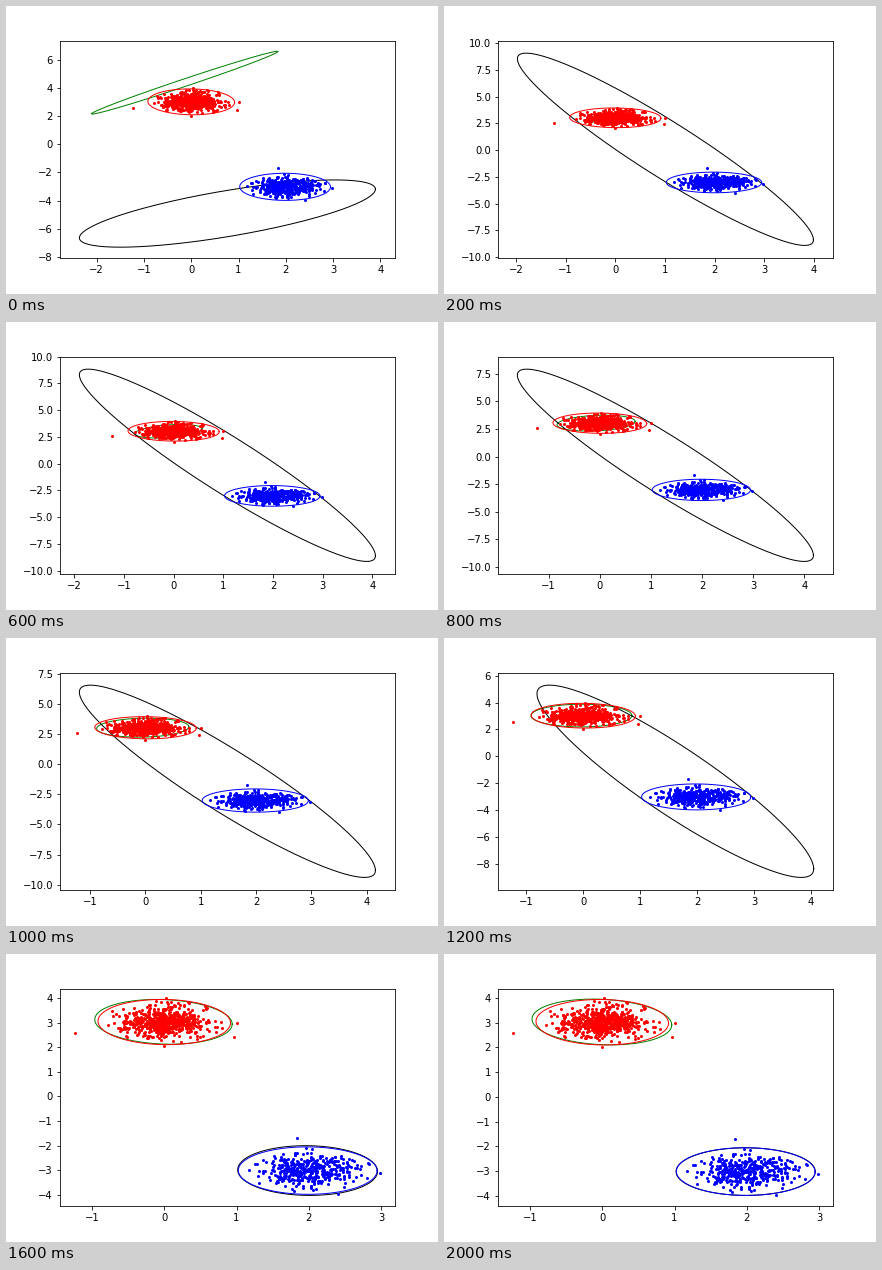
Write a matplotlib script that moves like this. It is 432 by 288 pixels and loops after 2200 ms.

```python
import numpy as np
import matplotlib.pyplot as plt
from matplotlib.animation import FuncAnimation

FRAMES, INTERVAL = 11, 200
PAD = 1.028      # ellipses claim slightly more room than their outline
MARGIN = 0.05
VAR = 0.103      # variance of one cluster along each axis
GAP = np.array([-1.88, 5.96])    # from the blue cluster to the red one

# ellipse: centre x, centre y, half width, half height, correlation
RED = np.array([0.0, 3.02, 0.917, 0.92, -0.04])
BLUE = np.array([1.985, -3.02, 0.96, 0.965, -0.01])
GREEN_START = (-0.14, 4.38, 1.97, 2.23, 0.992)
BLACK_START = (0.765, -4.92, 3.13, 2.39, 0.724)
SLIVER = np.array([-0.18, 3.02, 0.45, 0.40, 0.75])
GREEN_END = np.array([-0.005, 3.03, 0.967, 0.926, -0.13])

RED_STRAYS = [(-1.232, 2.57), (0.97, 2.42), (1.0, 3.0), (0.0, 2.03), (0.03, 3.98)]
BLUE_STRAYS = [(1.84, -1.7), (2.98, -3.13), (2.41, -3.97)]

rng = np.random.default_rng(7)
turn = np.linspace(0, 2 * np.pi, 241)


def cloud(centre, count, strays):
    pts = rng.normal(0, 0.31, (count, 2))
    pts = pts[np.hypot(*pts.T) < 0.9]
    return np.vstack([pts - pts.mean(axis=0) + centre, strays])


def outline(cx, cy, a, b, rho):
    x = cx + a * np.cos(turn)
    y = cy + b * (rho * np.cos(turn) + np.sqrt(1 - rho**2) * np.sin(turn))
    return x, y


def green_at(step):
    """A sliver inside the red cluster that eases out to its full size."""
    if step == 0:
        return GREEN_START
    grown = 1 - (1 - (step - 1) / (FRAMES - 2)) ** 2.3
    return SLIVER + (GREEN_END - SLIVER) * grown


def black_at(step):
    """Three-sigma ellipse of the blue cluster plus a falling share of the red."""
    if step == 0:
        return BLACK_START
    share = np.interp(step, [1, 3, 5, 6, 7, 8, 9],
                      [0.52, 0.48, 0.268, 0.195, 0.0585, 0.0003, 0])
    spread = share * (1 - share)
    sigma = np.sqrt(VAR + spread * GAP**2)
    rho = spread * GAP.prod() / sigma.prod()
    return *(BLUE[:2] + share * GAP), *(3 * sigma), rho


def limits(shapes, axis):
    lows = [s[axis] - PAD * s[axis + 2] for s in shapes]
    highs = [s[axis] + PAD * s[axis + 2] for s in shapes]
    lo = min(lows + [points[:, axis].min()])
    hi = max(highs + [points[:, axis].max()])
    pad = MARGIN * (hi - lo)
    return lo - pad, hi + pad


red_pts = cloud((0, 3.03), 600, RED_STRAYS)
blue_pts = cloud((2, -3), 420, BLUE_STRAYS)
points = np.vstack([red_pts, blue_pts])

fig, ax = plt.subplots(figsize=(6, 4), dpi=72)
fig.subplots_adjust(left=0.125, right=0.9, bottom=0.125, top=0.88)

green_line, = ax.plot([], [], color="green", lw=1, zorder=1)
black_line, = ax.plot([], [], color="black", lw=1, zorder=1)
for ellipse, pts, color in ((RED, red_pts, "red"), (BLUE, blue_pts, "blue")):
    ax.plot(*outline(*ellipse), color=color, lw=1, zorder=1)
    ax.scatter(*pts.T, s=4, color=color, zorder=2)


def update(step):
    green, black = green_at(step), black_at(step)
    green_line.set_data(*outline(*green))
    black_line.set_data(*outline(*black))
    shapes = [green, black, RED, BLUE]
    ax.set_xlim(limits(shapes, 0))
    ax.set_ylim(limits(shapes, 1))
    return green_line, black_line


anim = FuncAnimation(fig, update, frames=FRAMES, interval=INTERVAL,
                     repeat=True, repeat_delay=0)
plt.show()
```
